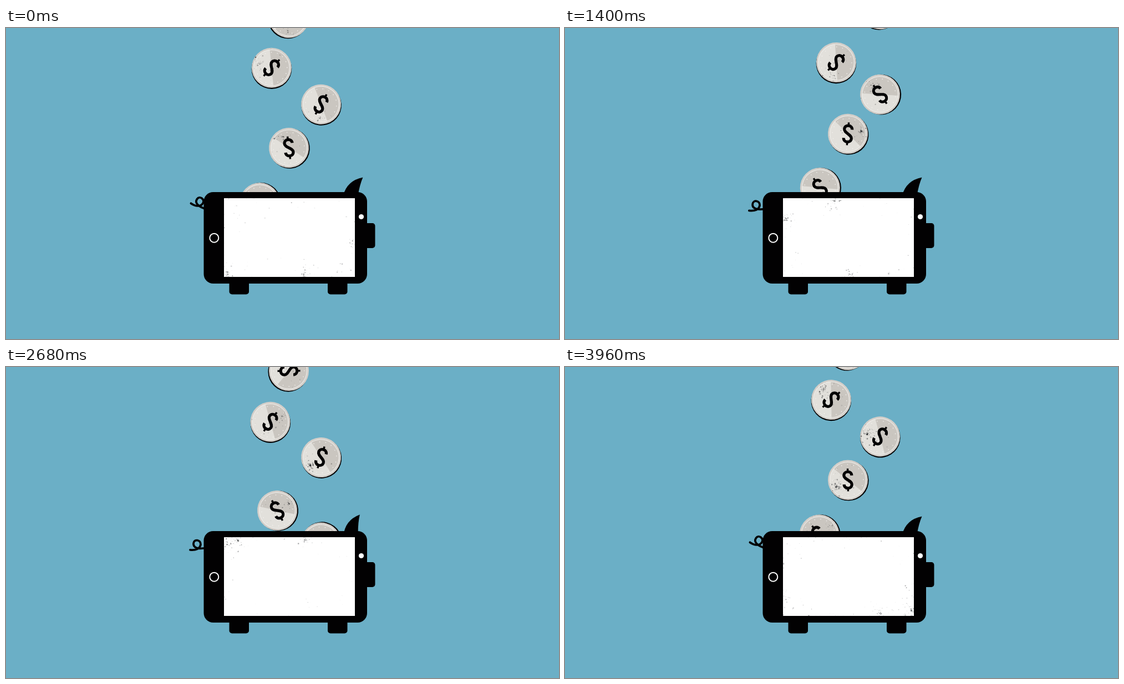
These frames come from a looping animation (997 px wide and 561 px high, 4000 ms). An HTML page with a canvas:

```html
<!DOCTYPE html>
<html lang="en">
<head>
<meta charset="utf-8">
<title>Piggy bank phone</title>
<style>
html, body { margin: 0; width: 100%; height: 100%; overflow: hidden; background: #6bafc6; }
canvas { display: block; }
</style>
</head>
<body>
<canvas id="stage" width="997" height="561"></canvas>
<script>
const ctx = document.getElementById('stage').getContext('2d');
const LOOP = 4000, STEP = 40, TAU = Math.PI * 2, RAD = Math.PI / 180;
const BLACK = '#020102';

// Lanes: start x, drift and fall in px/ms, start angle and spin in degrees
const lanes = {
  right:  { x: 568,   drift: 0,     fall: .1537, angle: 111, spin: -.0708 },
  slow:   { x: 568,   drift: 0,     fall: .1537, angle: -5,  spin: -.03 },
  middle: { x: 510,   drift: 0,     fall: .1537, angle: 111, spin: -.0708 },
  left:   { x: 489,   drift: 0,     fall: .1537, angle: 85,  spin: -.058 },
  slant:  { x: 488.7, drift: -.014, fall: .159,  angle: 85,  spin: -.058 }
};
const coins = [
  ['right', 2884], ['slow', 360], ['right', 1359], ['middle', 3898],
  ['middle', 2374], ['left', 736], ['slant', 3337], ['slant', 1807]
];

// Time, degrees
const earKeys = [[0, 0], [640, -14], [1400, 0], [1920, -15], [2680, -10], [3320, -3], [4000, 0]];
const tailKeys = [[0, 28], [667, 46], [1333, 0], [1960, 47], [2667, 0], [3333, 45], [4000, 28]];
const snoutKeys = [[0, 0], [3200, 0], [3320, 3], [3480, 0], [4000, 0]];

const dollar = new Path2D('M7-8C7-17-7-17-7-8C-7-1 7 1 7 8C7 17-7 17-7 8');
const dollarBar = new Path2D('M0-20.5V-14M0 14V20.5');
const ear = new Path2D('M608 302Q615 275 643.5 269.5Q638 282 634.5 302Z');
const tail = new Path2D('M332 330C342 331 350 328 351 320C351 311 339 310 338 318C337 327 348 329 362 326');

function pose(keys, t) {
  const i = keys.findIndex(k => k[0] > t);
  const [t0, a] = keys[i - 1], [t1, b] = keys[i];
  return a + (b - a) * (1 - Math.cos(Math.PI * (t - t0) / (t1 - t0))) / 2;
}

function random(seed) {
  let s = seed * 2654435761 >>> 0;
  return () => {
    s = s + 0x6d2b79f5 >>> 0;
    let n = Math.imul(s ^ s >>> 15, s | 1);
    n ^= n + Math.imul(n ^ n >>> 7, n | 61);
    return ((n ^ n >>> 14) >>> 0) / 4294967296;
  };
}

function disc(x, y, r, fill) {
  ctx.beginPath();
  ctx.arc(x, y, r, 0, TAU);
  ctx.fillStyle = fill;
  ctx.fill();
}

function box(x, y, w, h, r, fill = BLACK) {
  ctx.beginPath();
  ctx.roundRect(x, y, w, h, r);
  ctx.fillStyle = fill;
  ctx.fill();
}

function line(path, width, color) {
  ctx.lineWidth = width;
  ctx.strokeStyle = color;
  ctx.stroke(path);
}

function turned(x, y, degrees, draw) {
  ctx.save();
  ctx.translate(x, y);
  ctx.rotate(degrees * RAD);
  ctx.translate(-x, -y);
  draw();
  ctx.restore();
}

function speck(x, y, rnd, strength) {
  const w = .5 + rnd() ** 3 * 2;
  ctx.fillStyle = `rgba(25,27,30,${strength * (.2 + rnd() * .8)})`;
  ctx.fillRect(x, y, w, w * (.6 + rnd() * .6));
}

function cluster(x, y, spread, count, rnd, strength) {
  for (let i = 0; i < count; i++) {
    const a = rnd() * TAU, d = rnd() * rnd() * spread;
    speck(x + Math.cos(a) * d, y + Math.sin(a) * d, rnd, strength);
  }
}

function coin(x, y, degrees, rnd) {
  ctx.save();
  ctx.translate(x, y);
  ctx.rotate(degrees * RAD);
  disc(1.3, 1.3, 36.3, BLACK);
  disc(0, 0, 36, '#d3cfca');
  disc(0, 0, 33, '#e2e0db');
  ctx.beginPath();
  ctx.arc(0, 0, 33, -140 * RAD, 40 * RAD);
  ctx.fillStyle = '#cac6c0';
  ctx.fill();
  ctx.beginPath();
  ctx.arc(0, 0, 32.3, 0, TAU);
  ctx.lineWidth = 1;
  ctx.strokeStyle = '#f0eeea';
  ctx.stroke();
  for (let i = 0; i < 16; i++) {
    const a = i * TAU / 16;
    disc(Math.cos(a) * 28, Math.sin(a) * 28, .8, '#f3f1ee');
  }
  line(dollar, 5.2, BLACK);
  line(dollarBar, 3.4, BLACK);
  ctx.beginPath();
  ctx.arc(0, 0, 36, 0, TAU);
  ctx.clip();
  cluster(0, 0, 60, 30, rnd, .35);
  const a = rnd() * TAU;
  cluster(Math.cos(a) * 24, Math.sin(a) * 24, 26, 20 + rnd() ** 2 * 90, rnd, .55);
  ctx.restore();
}

function screenWear(rnd) {
  const x = 393, y = 307, w = 236, h = 142;
  ctx.save();
  ctx.beginPath();
  ctx.rect(x, y, w, h);
  ctx.clip();
  const edge = depth => {
    const side = Math.floor(rnd() * 4), along = rnd();
    return [
      side < 2 ? x + along * w : side === 2 ? x + depth : x + w - depth,
      side > 1 ? y + along * h : side === 0 ? y + depth : y + h - depth
    ];
  };
  const count = 40 + rnd() ** 2 * 260;
  for (let i = 0; i < count; i++) speck(...edge(rnd() ** 3 * 38), rnd, .4);
  for (let i = 0; i < 3; i++) cluster(...edge(5), 28, 15 + rnd() * 60, rnd, .45);
  ctx.restore();
}

function phone(t, rnd) {
  turned(622, 300, pose(earKeys, t), () => {
    ctx.fillStyle = BLACK;
    ctx.fill(ear);
  });
  ctx.lineCap = 'round';
  turned(360, 326, pose(tailKeys, t), () => line(tail, 3.8, BLACK));
  ctx.lineCap = 'butt';
  turned(645, 374, pose(snoutKeys, t), () => box(636, 352, 29.5, 45, 5));
  box(402.5, 445, 35.5, 35.5, 5);
  box(580, 445, 35.5, 35.5, 5);
  box(356.5, 296, 294.5, 165, 17);
  box(393, 307, 236, 142, 0, '#fff');
  screenWear(rnd);
  disc(640.5, 340.5, 4.6, '#fff');
  ctx.beginPath();
  ctx.arc(375.3, 378.7, 8, 0, TAU);
  ctx.lineWidth = 2;
  ctx.strokeStyle = '#fff';
  ctx.stroke();
}

function draw(t) {
  const step = Math.max(1, Math.floor(t / STEP));
  const now = step * STEP;
  ctx.fillStyle = '#6bafc6';
  ctx.fillRect(0, 0, 997, 561);
  coins.forEach(([name, start], i) => {
    const lane = lanes[name], age = (now - start + LOOP) % LOOP;
    const y = -40 + lane.fall * age;
    if (y < 340) coin(lane.x + lane.drift * age, y, lane.angle + lane.spin * age, random(step * 16 + i));
  });
  phone(now, random(step * 16 + 9));
  if (step % 16 === 0) disc(690.5, 410, 1, BLACK);
}

const start = performance.now();
function tick() {
  draw((performance.now() - start) % LOOP);
  requestAnimationFrame(tick);
}
tick();
</script>
</body>
</html>
```
